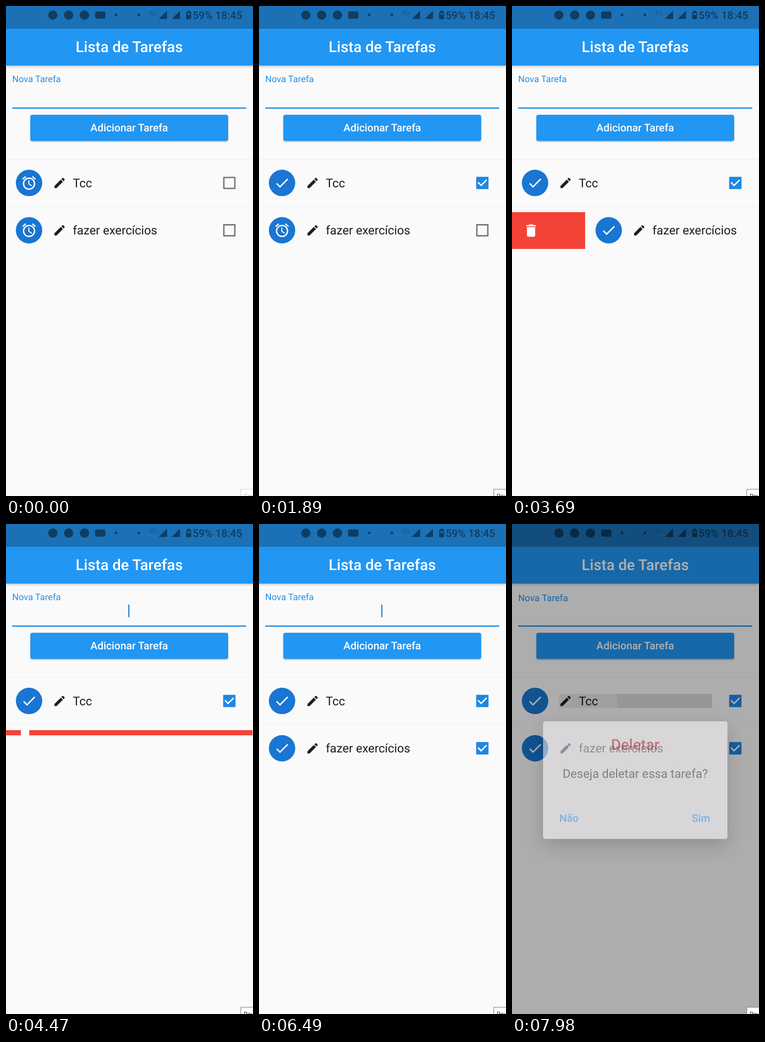
Write an HTML page with a canvas that moves like this. It is 477x946 px and loops after 8 s.

```html
<!DOCTYPE html>
<html lang="pt">
<head>
<meta charset="utf-8">
<title>Lista de Tarefas</title>
<style>
html, body { margin: 0; width: 100%; height: 100%; overflow: hidden; background: #fbfafb; }
canvas { display: block; width: 477px; height: 946px; }
</style>
</head>
<body>
<canvas id="stage" width="477" height="946"></canvas>
<script>
const W = 477, H = 946, LOOP = 8000, DP = 1.325;
const BLUE = '#2196f3', DARK = '#0f3d63';
const ctx = document.getElementById('stage').getContext('2d');

// Moments of the interaction, in ms
const CHECK_1 = 430, CHECK_2 = 1930, COLLAPSE = 4250, GONE = 4550,
      UNDO = 6130, PRESS = 7500, DIALOG = 7895, BLUR = 7948;
// The finger rests briefly halfway through the swipe
const DRAG = [[3280, 0], [3480, 62], [3670, 142], [3750, 143], [3900, 262], [4100, 425], [4230, 477]];

const ICON = {
  alarm: 'M22 5.72l-4.6-3.86-1.29 1.53 4.6 3.86L22 5.72zM7.88 3.39L6.6 1.86 2 5.71l1.29 1.53 4.59-3.85zM12.5 8H11v6l4.75 2.85.75-1.23-4-2.37V8zM12 4c-4.97 0-9 4.03-9 9s4.02 9 9 9c4.97 0 9-4.03 9-9s-4.03-9-9-9zm0 16c-3.87 0-7-3.13-7-7s3.13-7 7-7 7 3.13 7 7-3.13 7-7 7z',
  check: 'M9 16.17L4.83 12l-1.42 1.41L9 19 21 7l-1.41-1.41z',
  pencil: 'M3 17.25V21h3.75L17.81 9.94l-3.75-3.75L3 17.25zM20.71 7.04c.39-.39.39-1.02 0-1.41l-2.34-2.34c-.39-.39-1.02-.39-1.41 0l-1.83 1.83 3.75 3.75 1.83-1.83z',
  trash: 'M6 19c0 1.1.9 2 2 2h8c1.1 0 2-.9 2-2V7H6v12zM19 4h-3.5l-1-1h-5l-1 1H5v2h14V4z'
};
for (const k in ICON) ICON[k] = new Path2D(ICON[k]);

const clamp = v => Math.max(0, Math.min(1, v));
const ramp = (t, start, len) => clamp((t - start) / len);
const mix = (a, b, p) => a + (b - a) * p;

// CSS-style cubic Bezier easing
function bezier(x1, y1, x2, y2) {
  const at = (a, b, u) => 3 * a * u * (1 - u) ** 2 + 3 * b * u * u * (1 - u) + u ** 3;
  return x => {
    let lo = 0, hi = 1;
    for (let i = 0; i < 20; i++) {
      const mid = (lo + hi) / 2;
      if (at(x1, x2, mid) < x) lo = mid; else hi = mid;
    }
    return at(y1, y2, (lo + hi) / 2);
  };
}
const ease = bezier(.25, .1, .25, 1);
const fastOutSlowIn = bezier(.4, 0, .2, 1);

function along(points, t) {
  if (t <= points[0][0]) return points[0][1];
  for (let i = 1; i < points.length; i++) {
    const [t0, v0] = points[i - 1], [t1, v1] = points[i];
    if (t <= t1) return mix(v0, v1, (t - t0) / (t1 - t0));
  }
  return points[points.length - 1][1];
}

function rect(x, y, w, h, fill) {
  ctx.fillStyle = fill;
  ctx.fillRect(x, y, w, h);
}

function round(x, y, w, h, r, fill) {
  ctx.fillStyle = fill;
  ctx.beginPath();
  ctx.roundRect(x, y, w, h, r);
  ctx.fill();
}

function disc(x, y, r, fill) {
  ctx.fillStyle = fill;
  ctx.beginPath();
  ctx.arc(x, y, r, 0, 7);
  ctx.fill();
}

function poly(points, fill) {
  ctx.fillStyle = fill;
  ctx.beginPath();
  points.forEach(p => ctx.lineTo(...p));
  ctx.fill();
}

function text(str, x, y, size, fill, weight = 400, align = 'left') {
  ctx.font = `${weight} ${size}px Roboto, sans-serif`;
  ctx.textRendering = 'geometricPrecision';
  ctx.textAlign = align;
  ctx.fillStyle = fill;
  ctx.fillText(str, x, y);
}

function icon(name, cx, cy, size, fill) {
  ctx.save();
  ctx.translate(cx - size / 2, cy - size / 2);
  ctx.scale(size / 24, size / 24);
  ctx.fillStyle = fill;
  ctx.fill(ICON[name]);
  ctx.restore();
}

function shadowed(color, blur, dy, draw) {
  ctx.save();
  ctx.shadowColor = color;
  ctx.shadowBlur = blur;
  ctx.shadowOffsetY = dy;
  draw();
  ctx.restore();
}

function clipped(x, y, w, h, draw) {
  ctx.save();
  ctx.beginPath();
  ctx.rect(x, y, w, h);
  ctx.clip();
  draw();
  ctx.restore();
}

function statusBar() {
  rect(0, 0, W, 44, '#1c70b5');
  for (const x of [90.5, 121, 151.5]) disc(x, 17.5, 9, DARK);
  round(172, 10.5, 20, 14, 4, DARK);
  disc(212.5, 17, 2.6, DARK);
  disc(256.5, 17, 2.6, DARK);
  text('4G', 275, 18, 12.5, '#195a94');
  for (const x of [295, 320]) poly([[x, 25], [x + 16, 25], [x + 16, 9]], DARK);
  rect(350.5, 9, 4.5, 3, DARK);
  round(348, 11, 9.5, 14.5, 1.5, DARK);
  rect(350, 14, 5.5, 3, '#1c70b5');
  text('59%', 360.5, 25, 20.4, DARK, 500);
  text('18:45', 456, 25, 20.4, DARK, 500, 'right');
}

function header(t) {
  shadowed('rgba(0,0,0,.28)', 5, 1.5, () => rect(0, 40, W, 75, BLUE));
  statusBar();
  text('Lista de Tarefas', 238, 89, 29.1, '#fff', 500, 'center');

  const p = fastOutSlowIn(ramp(t, BLUR, 200));
  text('Nova Tarefa', 12, mix(146.5, 177, p), mix(17.5, 23.3, p), '#2590e4');
  rect(12, 195.8, 452, 2.6, '#2490e6');
  const phase = t % 1000;
  if (t < BLUR && phase >= 100 && phase < 600) rect(236, 155.5, 2.4, 24.5, '#2c86cc');

  shadowed('rgba(0,0,0,.28)', 3, 1.5, () => round(47, 210, 382, 50.5, 4, BLUE));
  text('Adicionar Tarefa', 238, 242, 20.4, '#fff', 500, 'center');
}

function checkbox(cx, cy, p) {
  const s = 18 * DP, x = cx - s / 2, y = cy - s / 2;
  const fill = clamp(p * 2), tick = clamp(p * 2 - 1);
  const color = [[117, 30], [117, 136], [120, 229]].map(([a, b]) => mix(a, b, fill));
  const edge = mix(2 * DP, s / 2, fill), inner = s - 2 * edge;
  round(x, y, s, s, 1, `rgb(${color})`);
  if (inner > 0) rect(x + edge, y + edge, inner, inner, '#fbfafb');
  if (!tick) return;
  const a = clamp(tick * 2), b = clamp(tick * 2 - 1);
  ctx.strokeStyle = '#fff';
  ctx.lineWidth = 2 * DP;
  ctx.beginPath();
  ctx.moveTo(x + .15 * s, y + .45 * s);
  ctx.lineTo(x + mix(.15, .4, a) * s, y + mix(.45, .7, a) * s);
  if (b) ctx.lineTo(x + mix(.4, .85, b) * s, y + mix(.7, .25, b) * s);
  ctx.stroke();
}

function row(label, y, dx, checked) {
  disc(44.5 + dx, y, 25.5, '#1976d2');
  icon(checked ? 'check' : 'alarm', 44.5 + dx, y, 24 * DP, '#fff');
  icon('pencil', 103.5 + dx, y, 20 * DP, '#1c1d22');
  text(label, 129 + dx, y + 8.2, 23.3, '#1b1c20');
  checkbox(431.3 + dx, y, checked);
}

function pressInk(t) {
  const p = ramp(t, PRESS, 100);
  if (!p) return;
  clipped(91, 328, 295, 27, () => {
    rect(91, 328, 295, 27, `rgba(0,0,0,${.08 * p})`);
    disc(300, 341.5, mix(8, 97, ramp(t, PRESS, 480)), `rgba(0,0,0,${.06 * p})`);
  });
}

function list(t) {
  const removed = t >= GONE && t < UNDO;
  rect(0, 295, W, 1.5, '#eff1f2');
  if (!removed) rect(0, 386.7, W, 1.3, '#eff1f3');
  pressInk(t);
  row('Tcc', 341.6, 0, ramp(t, CHECK_1, 200));
  if (removed) return;

  const dx = t < UNDO ? along(DRAG, t) : 0;
  if (dx > 0) {
    const h = Math.round(71 * (1 - ease(ramp(t, COLLAPSE + 120, 180))));
    clipped(0, 398, dx - 1, h, () => {
      rect(0, 398, W, 71, '#f44336');
      icon('trash', 36.8, 398 + h / 2, 24 * DP, '#fff');
    });
  }
  if (dx < W) row('fazer exercícios', 433, dx, ramp(t, CHECK_2, 200));
}

function snackbar(t) {
  if (t < GONE || t > UNDO + 250) return;
  const leaving = t >= UNDO;
  const p = leaving ? 1 - ramp(t, UNDO, 250) : ramp(t, GONE, 250);
  ctx.save();
  ctx.translate(0, 84 * (1 - fastOutSlowIn(p)));
  rect(0, 862, W, 90, '#323232');
  ctx.globalAlpha = leaving ? p : clamp((p - .45) / .55);
  text('Tarefa fazer exercícios', 29.5, 899, 20.4, '#fff');
  text('removida!', 29.5, 923, 20.4, '#fff');
  text('Desfazer', 348.5, 911, 20.4, '#cb3638', 500);
  ctx.restore();
}

function dialog(t) {
  const p = ramp(t, DIALOG, 150);
  if (!p) return;
  const box = [60, 381, 356, 227, 5];
  rect(0, 0, W, H, `rgba(0,0,0,${.54 * p})`);
  ctx.save();
  ctx.globalAlpha = p * .92;

  // Keep the shadow from showing through the translucent card
  ctx.save();
  ctx.beginPath();
  ctx.rect(0, 0, W, H);
  ctx.roundRect(...box);
  ctx.clip('evenodd');
  shadowed('rgba(0,0,0,.3)', 36, 14, () => round(...box, '#fff'));
  ctx.restore();

  round(...box, '#fffcff');
  text('Deletar', 238, 436, 29.1, '#a8202e', 500, 'center');
  text('Deseja deletar essa tarefa?', 238, 490, 23.3, '#333', 400, 'center');
  text('Não', 91.5, 575, 20.4, BLUE, 500);
  text('Sim', 382.5, 575, 20.4, BLUE, 500, 'right');
  ctx.restore();
}

function cornerTip(t) {
  const p = ramp(t, 70, 400);
  rect(453, 932.5, 30, 20, `rgb(${Array(3).fill(mix(205, 120, p))})`);
  rect(454, 933.5, 30, 20, '#fff');
  text(t < 200 ? 'Gravar' : 'Pausar', 459, 950, 11.5, `rgba(40,40,40,${mix(.35, 1, p)})`);
}

function draw(t) {
  rect(0, 0, W, H, '#fbfafb');
  header(t);
  list(t);
  snackbar(t);
  dialog(t);
  cornerTip(t);
}

const begin = performance.now();
function tick() {
  draw((performance.now() - begin) % LOOP);
  requestAnimationFrame(tick);
}
tick();
</script>
</body>
</html>
```
